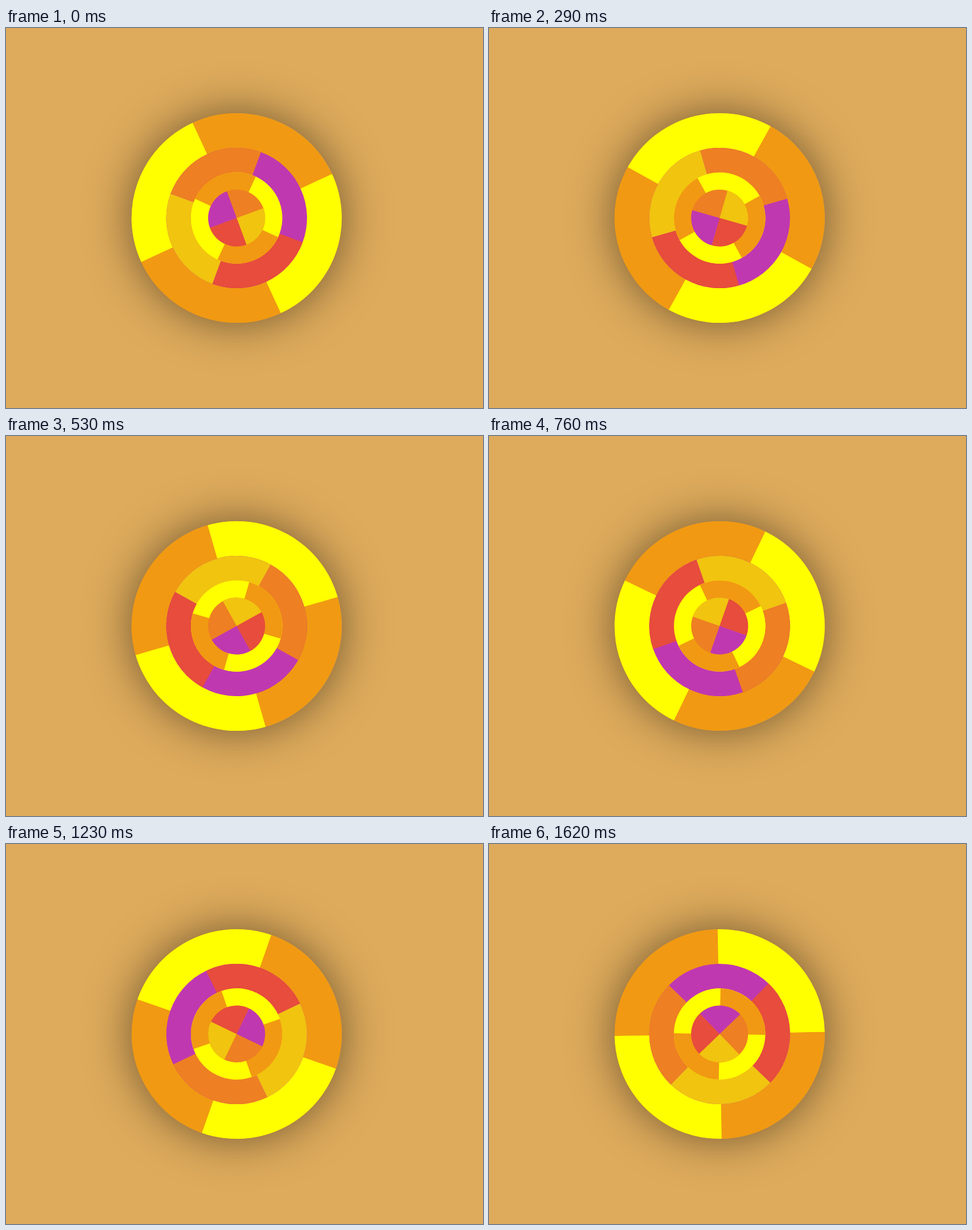
These frames come from a looping animation (838x669 px, 1690 ms). An HTML page:

```html
<!DOCTYPE html>
<html lang="en">
<head>
<meta charset="utf-8">
<title>Spinning rings</title>
<style>
html, body { margin: 0; width: 100%; height: 100%; overflow: hidden; background: #deab5c; }
#shadow {
  position: absolute; left: 220.7px; top: 150px; width: 369px; height: 369px;
  border-radius: 50%; box-shadow: 0 0 80px rgba(0, 0, 0, .5);
}
svg { position: absolute; left: 0; top: 0; display: block; }
</style>
</head>
<body>
<div id="shadow"></div>
<svg id="stage" width="838" height="669" viewBox="0 0 838 669"></svg>
<script>
const CX = 405.2, CY = 334.5;
const LOOP = 1690, STEPS = 22, LEAD = 18;
const AMBER = '#f19912', YELLOW = '#ffff00', CARROT = '#ee7f22',
      GOLD = '#f1c40f', RED = '#e74c3c', PURPLE = '#c038b0';

// Quarter colours run clockwise from the ring's own zero angle.
const rings = [
  { r: 184.6, dir: 1, offset: 0, colors: [AMBER, YELLOW, AMBER, YELLOW] },
  { r: 123.6, dir: 1, offset: 45, colors: [PURPLE, RED, GOLD, CARROT] },
  { r: 80.3, dir: -1, offset: 0, colors: [YELLOW, AMBER, YELLOW, AMBER] },
  { r: 50, dir: -1, offset: 45, colors: [CARROT, GOLD, RED, PURPLE] }
];

// [step, degrees]: a nearly even spin, a touch uneven at the start.
const spin = [[0, -24.8], [4, 29], [7, 74], [21, 268.9]];

const stage = document.getElementById('stage');

function add(parent, tag, attrs) {
  const el = document.createElementNS('http://www.w3.org/2000/svg', tag);
  for (const key in attrs) el.setAttribute(key, attrs[key]);
  return parent.appendChild(el);
}

for (const ring of rings) {
  const { r, colors } = ring;
  ring.el = add(stage, 'g', {});
  add(ring.el, 'circle', { r, fill: colors[0] });
  colors.slice(1).forEach((fill, i) => add(ring.el, 'path', {
    d: `M0 0V${-r}A${r} ${r} 0 0 1 ${r} 0Z`,
    transform: `rotate(${(i + 1) * 90})`,
    fill
  }));
}

function angleAt(step) {
  const i = spin.findIndex(([s], n) => n > 0 && step <= s);
  const [s0, a0] = spin[i - 1], [s1, a1] = spin[i];
  return a0 + (a1 - a0) * (step - s0) / (s1 - s0);
}

// The wheel ticks from pose to pose and jumps back when the loop ends.
function draw(ms) {
  const t = ms % LOOP;
  const step = Math.min(STEPS - 1, Math.floor((t + LEAD) * STEPS / LOOP));
  const angle = angleAt(step);
  for (const { el, dir, offset } of rings) {
    el.setAttribute('transform', `translate(${CX} ${CY}) rotate(${dir * (angle + offset)})`);
  }
}

const start = performance.now();
function loop() {
  draw(performance.now() - start);
  requestAnimationFrame(loop);
}
loop();
</script>
</body>
</html>
```
